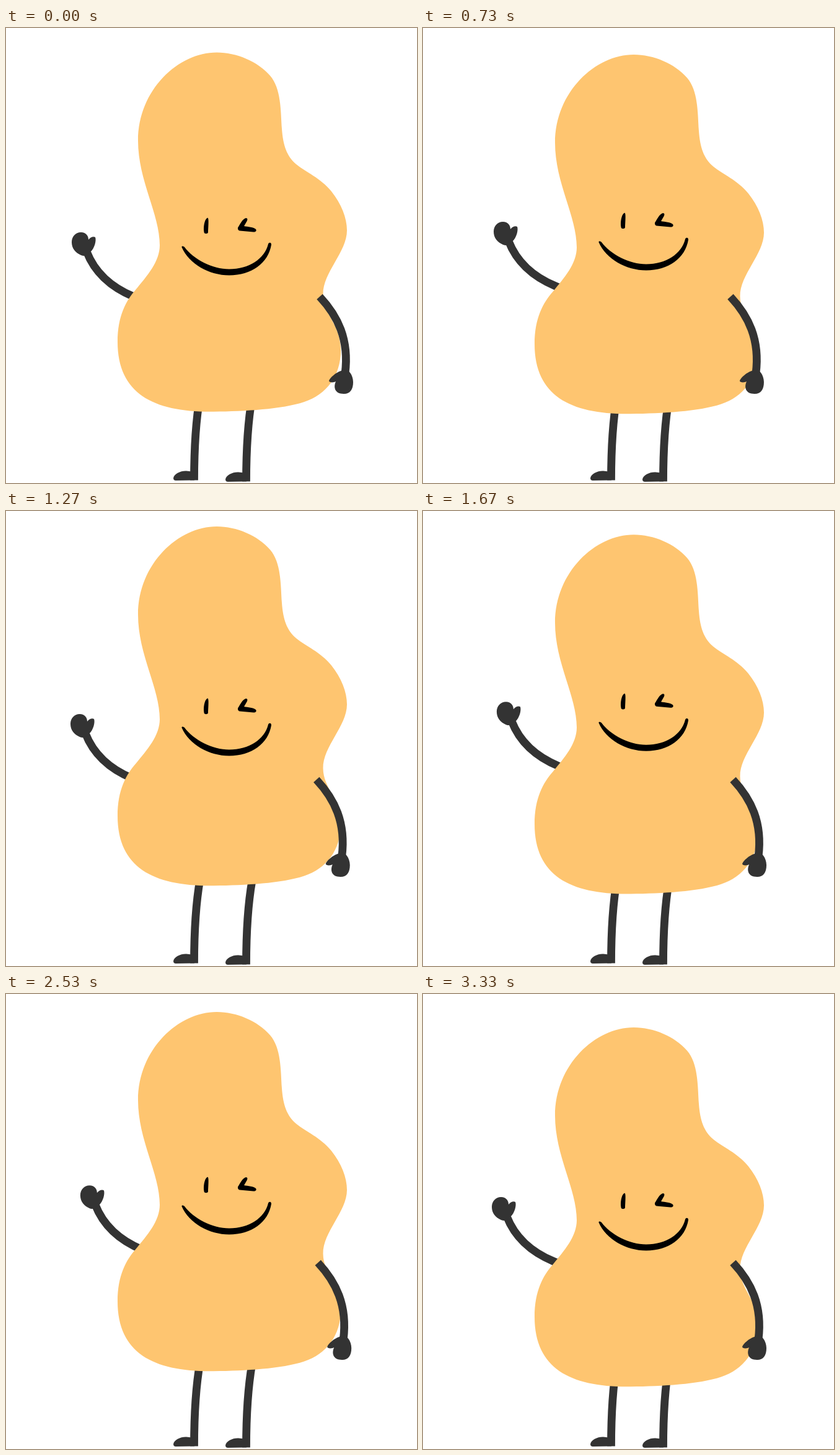
An HTML page with a canvas for the animation above (5.01 s loop, 663 px wide and 735 px high).

```html
<!DOCTYPE html>
<html lang="en">
<head>
<meta charset="utf-8">
<title>Waving blob</title>
<style>
  html, body { margin: 0; width: 100%; height: 100%; overflow: hidden; background: #fff; }
  canvas { display: block; }
</style>
</head>
<body>
<canvas id="stage" width="663" height="735"></canvas>
<script>
const LOOP = 5010;
const SKIN = '#fec570', LIMB = '#333333', INK = '#000000';
const ctx = document.getElementById('stage').getContext('2d');

const body = new Path2D(`M340 39.5 C372 39.5 406 54 426 77 C444 98 443 133 445 163
  C447 190 453 207 468 220 C485 234 506 241 525 264 C541 284 550 307 550 327
  C550 362 511 395 511.5 430 C512 464 540 478 540 521 C540 562 517 592 481 604
  C445 616 386 619 335 619.8 C240 621 180 592 180 507 C180 465 194 440 209 423
  C228 400 248 377 248 351 C248 300 213 247 213 182 C213 100 278 39.5 340 39.5Z`);

const leg = new Path2D('M313 595 C306 635 303.5 685 303.5 730.5');
const foot = new Path2D('M270 727 C271 720 282 715 291 715.5 L304 717 V730.5 L274 731 Q270 731 270 727Z');

const waveArm = new Path2D('M130 361 C142 392 165 417 206 434 L225 442');
const waveHand = new Path2D(`M133 342 C136 338 141 336 144 338 C146 343 143 356 136 362
  C132 368 126 369 121 367 C112 363 106 356 106 346 C106 337 112 330 121 330 C129 330 133 336 133 342Z`);

const restArm = new Path2D('M506 434 C535 465 554 503 547 558');
const restHand = new Path2D(`M540 554 C533 556 522 565 521 570 C521 573 529 573 532 571
  C528 580 530 591 545 591 C555 591 560 584 560 572 C560 560 552 551 546 551Z`);

const eyes = new Path2D(`M325 306.5 C327 307 327 312 326 330 C325.5 333 320 333 319.5 330 C318 322 320 309 325 306.5Z
  M387 307 C390 307 390 310 388 313 L384 320 C390 321 400 322 403 325 C405 328 402 330 399 329.5
  L377 327.5 C374 327 373 323 375 321 C378 316 382 308 387 307Z`);
const mouth = new Path2D(`M283.5 354 C295 381 328 399.5 360 399.5 C396 399.5 423 380 428 350
  C428 346 424 346 423 349 C417 373 392 389.5 360 389.5 C333 389.5 303 374 288 354 C286 352 283 352 283.5 354Z`);

// Swing between turning values on a steady beat, resting at both ends.
function swing(start, beat, ...turns) {
  return t => {
    const p = Math.min(Math.max((t - start) / beat, 0), turns.length - 1);
    const i = Math.min(Math.floor(p), turns.length - 2), u = p - i;
    return turns[i] + (turns[i + 1] - turns[i]) * u * u * (3 - 2 * u);
  };
}

const bodyY = swing(0, 320, 0, -14, 6, -7, -14.5, -3, 11, -7, -10.6, 16, 14.5);
const faceY = swing(270, 458, 0, -8, -3.2, -12, 7, -11.3, 15);
const waveX = swing(270, 458, 0, 8, -3.5, 13, 2, 14, 5);
const waveY = swing(270, 458, 0, -17, 0, -22, -5, -21, -2);
const restX = swing(480, 350, 0, -12.5, -5, -6.5, -5, -11.5, -2.3, -12, -6);

function part(x, y, color, shapes, line) {
  ctx.save();
  ctx.translate(x, y);
  ctx.fillStyle = ctx.strokeStyle = color;
  ctx.lineWidth = 12.8;
  if (line) ctx.stroke(line);
  shapes.forEach(s => ctx.fill(s));
  ctx.restore();
}

function draw(t) {
  ctx.fillStyle = '#fff';
  ctx.fillRect(0, 0, 663, 735);
  part(0, 0, LIMB, [foot], leg);
  part(84, 2, LIMB, [foot], leg);
  part(waveX(t), waveY(t), LIMB, [waveHand], waveArm);
  part(0, bodyY(t), SKIN, [body]);
  part(0, faceY(t), INK, [eyes, mouth]);
  part(restX(t), 0, LIMB, [restHand], restArm);
}

const start = performance.now();
function tick() {
  draw((performance.now() - start) % LOOP);
  requestAnimationFrame(tick);
}
tick();
</script>
</body>
</html>
```
